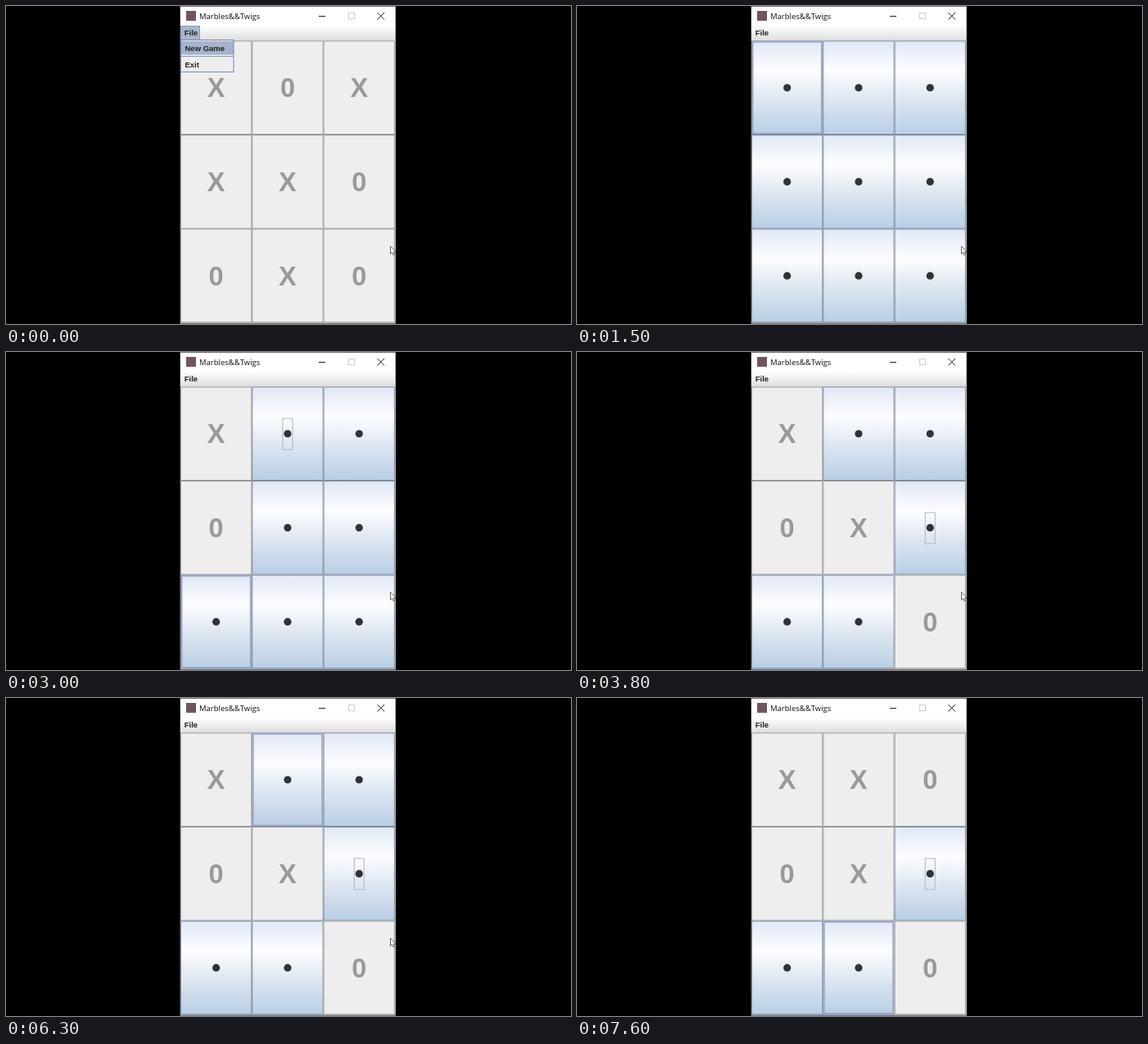
Animation of 690x388 px, one loop 8000 ms. Source, as an HTML page with a canvas:

```html
<!DOCTYPE html>
<html lang="en">
<head>
<meta charset="utf-8">
<style>
  html, body { margin: 0; width: 100%; height: 100%; overflow: hidden; background: #000; }
  canvas { display: block; }
</style>
</head>
<body>
<canvas id="stage" width="690" height="388"></canvas>
<script>
const ctx = document.getElementById('stage').getContext('2d');
const LOOP = 8000;
const LEFT = 213, TOP = 42.3, CELL_W = 87.3, CELL_H = 114.7;
const SANS = '"Liberation Sans", Arial, sans-serif';

// start time, board, hovered cell, focused cell
const states = [
  [0, 'X0XXX00X0', -1, -1],
  [400, '.........', -1, -1],
  [1400, '.........', 0, -1],
  [1800, 'X..0.....', -1, 1],
  [2600, 'X..0.....', 6, 1],
  [3300, 'X..0.....', -1, 1],
  [3400, 'X..0.....', 4, 1],
  [3800, 'X..0X...0', -1, 5],
  [5000, 'X..0X...0', 1, 5],
  [7000, 'XX00X...0', -1, 5],
  [7400, 'XX00X...0', 7, 5]
];

function rect(x, y, w, h, color) {
  ctx.fillStyle = color;
  ctx.fillRect(x, y, w, h);
}

function frame(x, y, w, h, color, width = 1) {
  ctx.strokeStyle = color;
  ctx.lineWidth = width;
  ctx.strokeRect(x, y, w, h);
}

function text(str, x, y, font, color, align = 'left') {
  ctx.font = font;
  ctx.fillStyle = color;
  ctx.textAlign = align;
  ctx.fillText(str, x, y);
}

function line(color, ...points) {
  ctx.strokeStyle = color;
  ctx.lineWidth = 1;
  ctx.beginPath();
  for (const [x1, y1, x2, y2] of points) {
    ctx.moveTo(x1, y1);
    ctx.lineTo(x2, y2);
  }
  ctx.stroke();
}

function gradient(y, h, ...stops) {
  const g = ctx.createLinearGradient(0, y, 0, y + h);
  for (const [at, color] of stops) g.addColorStop(at, color);
  return g;
}

function drawWindow() {
  rect(0, 0, 690, 388, '#000');
  rect(212.5, 0, 263.5, 388, '#777');
  rect(213, 1, 262.5, 23, '#fff');
  rect(213, 24, 262.5, 18, gradient(24, 18, [0, '#fff'], [1, '#dedede']));
  rect(213, 42, 262.5, 344.5, '#eee');

  rect(220, 6, 12, 12, '#705560');
  text('Marbles&&Twigs', 236, 16, '9.5px "Open Sans", "Noto Sans", sans-serif', '#111');
  line('#222', [382, 12.5, 390, 12.5], [453.5, 8, 462, 16.5], [462, 8, 453.5, 16.5]);
  frame(418.5, 8.5, 7, 7, '#ccc');
}

function drawMenu(open) {
  const font = 'bold 9.5px ' + SANS;
  if (open) {
    rect(213, 24, 24, 17, '#a9b5cb');
    frame(213.5, 24.5, 23, 17, '#8997b5', 0.8);
    rect(213, 41, 65, 40, '#eee');
    rect(214, 43, 64, 16.5, '#a5b3cc');
    line('#8299c5', [214, 61.5, 278, 61.5]);
    frame(213.5, 41.5, 64.5, 39, '#7188b8');
    text('New Game', 218.5, 55, font, '#222');
    text('Exit', 218.5, 75, font, '#222');
  }
  text('File', 217.7, 36.3, font, '#222');
}

function drawCell(i, mark, hovered, focused) {
  const x = LEFT + i % 3 * CELL_W, y = TOP + Math.floor(i / 3) * CELL_H;
  const cx = x + CELL_W / 2, cy = y + CELL_H / 2;
  const enabled = mark === '.';

  rect(x, y, CELL_W, CELL_H, enabled
    ? gradient(y, CELL_H, [0, '#e0e7f5'], [0.32, '#fdfdff'], [0.6, '#dfe8f3'], [1, '#b9cee4'])
    : '#eee');
  frame(x + 0.5, y + 0.5, CELL_W - 1, CELL_H - 1, enabled ? '#7f8c9d' : '#999');
  if (hovered) frame(x + 1.7, y + 1.7, CELL_W - 3.4, CELL_H - 3.4, '#98aac9', 1.5);
  if (!enabled) {
    text(mark, cx, cy + 11.7, 'bold 32.5px ' + SANS, '#999', 'center');
    return;
  }
  ctx.fillStyle = '#303236';
  ctx.beginPath();
  ctx.arc(cx, cy + 0.1, 4.6, 0, 7);
  ctx.fill();
  if (focused) frame(cx - 6, cy - 18.5, 12, 38, '#a9b9ca');
}

function drawCursor() {
  ctx.save();
  ctx.beginPath();
  ctx.rect(468, 292, 8, 13);
  ctx.clip();
  ctx.translate(469.5, 293);
  const arrow = new Path2D('M0 0V9.5L2.1 7.6L3.6 11L5.2 10.3L3.8 7H6.7Z');
  ctx.fillStyle = '#fff';
  ctx.fill(arrow);
  ctx.strokeStyle = '#444';
  ctx.lineWidth = 0.8;
  ctx.stroke(arrow);
  ctx.restore();
}

function draw(now) {
  const t = now % LOOP;
  const [, board, hover, focus] = states.findLast(s => s[0] <= t);
  drawWindow();
  [...board].forEach((mark, i) => drawCell(i, mark, i === hover, i === focus));
  drawMenu(t < 400);
  if (t < 7600) drawCursor();
  requestAnimationFrame(() => draw(performance.now()));
}

draw(0);
</script>
</body>
</html>
```
